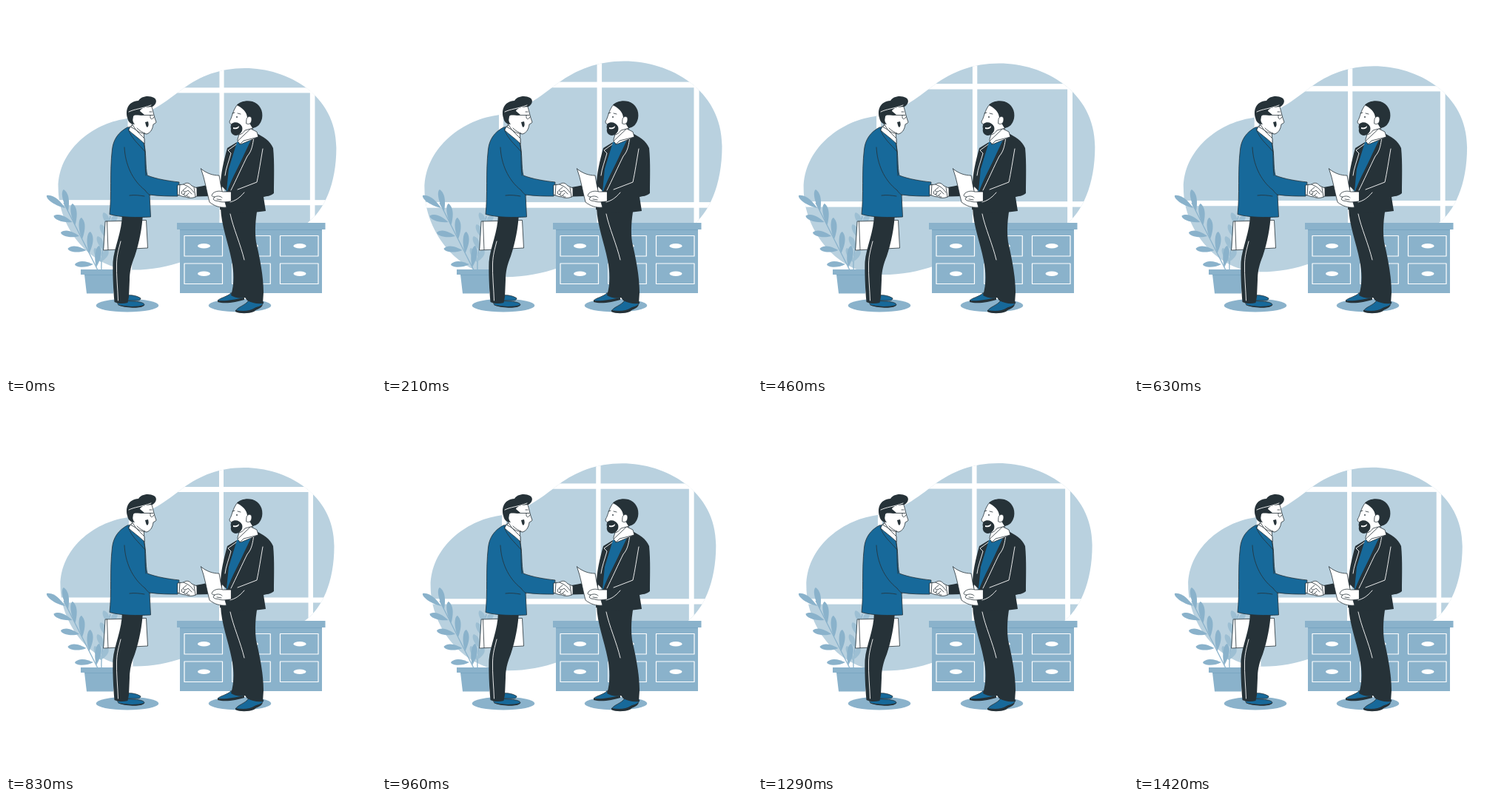
Write an HTML page that moves like this. It is 500 by 500 pixels and loops after 1.5 s.

```html
<!DOCTYPE html>
<html lang="en">
<head>
<meta charset="utf-8">
<title>Handshake</title>
<style>
html, body { margin: 0; width: 100%; height: 100%; overflow: hidden; background: #fff; }
svg { display: block; width: 100%; height: 100%; }
.tint { fill: #b9d1df; }
.mid { fill: #8ab2cb; }
.pale { fill: #9dbfd3; }
.blue { fill: #17699a; }
.dark { fill: #263238; }
.white { fill: #fff; }
.ink { stroke: #263238; stroke-width: .8; stroke-linejoin: round; stroke-linecap: round; }
.light { stroke: #fff; stroke-width: .9; stroke-linecap: round; stroke-linejoin: round; }
.line { fill: none; }
</style>
</head>
<body>
<svg viewBox="0 0 500 500">
  <defs>
    <path id="shape" d="M322 86C378 86 443.500 121 443.500 192C443.500 241 427 276 405 292C372 314 290 326 240 343C220 350 198 354.500 174 354.500C118 354.500 73.500 300 73.500 245C73.500 196 118 160 163 153.500C196 148 216 131 240 113C262 97 288 86 322 86Z"/>
    <clipPath id="clip"><use href="#shape"/></clipPath>
  </defs>

  <g id="window">
    <use href="#shape" class="tint"/>
    <g class="white" clip-path="url(#clip)">
      <rect x="60" y="112" width="400" height="7"/>
      <rect x="60" y="261.500" width="400" height="7"/>
      <rect x="166" y="70" width="5.500" height="300"/>
      <rect x="288" y="70" width="6" height="300"/>
      <rect x="408.500" y="70" width="6.500" height="300"/>
    </g>
  </g>

  <g id="plant">
    <path class="line" stroke="#8ab2cb" stroke-width="1.300" d="M124 357L78 266M129 357C128 335 134 315 141 284"/>
    <g id="sprig" class="pale"></g>
    <g id="frond" class="mid"></g>
    <path class="mid" d="M101 356H152V363H148L145 388.500H109L106 363H101Z"/>
    <path class="line" stroke="#78a5c1" stroke-width=".8" d="M106 363.500H148"/>
  </g>

  <g id="cabinet">
    <path class="mid" d="M231 293H431.500V302H427V388H235V302H231Z"/>
    <path class="line" stroke="#78a5c1" stroke-width="1" d="M235 302.500H427"/>
    <g id="drawers" class="line light"></g>
  </g>

  <g class="mid">
    <ellipse cx="164" cy="404.700" rx="42.300" ry="8.800"/>
    <ellipse cx="316" cy="404.700" rx="42.300" ry="8.800"/>
  </g>

  <g id="guest">
    <path class="white ink" d="M134.500 291L189.500 289.500L191.500 327L132 330Z"/>
    <path class="line ink" d="M136.500 291L138 329.500"/>
    <path class="blue ink" d="M164 391C170 390 178 392 182 395C182 397 180 398 177 398H164Z"/>
    <path class="blue ink" d="M151 401C158 397 166 399 174 399C181 400 187 401 187 404C184 407 174 407 168 406.500C161 406 155 405 152 404Z"/>
    <path class="dark" d="M152 404C160 406 177 407 187 404C185 408 174 408 168 407.500C161 407 154 406 152 404Z"/>
    <path class="dark" d="M157 280H185C184 300 180 320 174 338C169 350 167 360 167 370L166 393L164.500 401C158 403 150 402 146.500 400C145 382 144 362 144.500 346C146 326 157 306 157 280Z"/>
    <path class="line light" d="M155 318C152 330 150 336 149.500 348C149 364 151 382 151.500 398"/>
    <path class="white ink" d="M170 161L186 163L187 187L168 168Z"/>
    <path class="blue ink" d="M164 164C151 171 145 181 143.500 194C140 224 143 256 140 281.500C156 286 178 286 195.500 285L194 255C207 257 221 257 232 257L234 238C220 236.500 204 234 191 229C188 217 190 200 186.500 186C181 176 173 169 168 164Z"/>
    <path class="line ink" d="M160 191C161 213 170 235 188 249C190 252 193 255 195 256M167 256C174 255 181 256 187 257M165 166C170 180 178 185 188 197M187 187C189 200 187 214 189 229"/>
    <path class="white ink" d="M168 163L175 167L187 179L187 186C180 179 171 173 166 168Z"/>
    <path class="white ink" d="M173 143C180 137 191 135 197 136C199 143 200 149 203 157C202 159 200 159 199 160C198 166 196 171 190 173C182 172 177 170 174 165L170 159Z"/>
    <path class="dark" d="M164 151C161 140 165 129 179 128C182 122 193 120 200 124C205 127 203 133 198 136C190 136 182 138 181 142L187 147C180 149 174 146 172 149C170 153 172 158 174 160C169 160 165 157 164 151Z"/>
    <path class="line light" d="M166 143C174 139 183 139 196 134"/>
    <path class="line ink" d="M182 147.500H199M195 147.500C194 154 198 154 200 150M194 143L197 143M188 172C184 171 180 168 177 165"/>
    <path class="dark" d="M188 157L192 156C193 160 193 162 191 164C189 163 189 160 188 157Z"/>
  </g>

  <g id="host">
    <path class="blue ink" d="M304 388L322 392C321 396 317 396 312 397C306 400 293 401 286 398C290 394 299 393 304 388Z"/>
    <path class="dark" d="M286 398C297 399 307 397 322 394V397C312 400 296 403 286 400Z"/>
    <path class="blue ink" d="M328 398L348 400C347 406 339 407 335 411C328 415 317 415 310 412C314 406 323 405 328 398Z"/>
    <path class="dark" d="M310 411C321 413 330 412 336 408C340 406 344 406 347 403C346 409 339 409 335 413C328 416 315 416 310 413Z"/>
    <path class="dark" d="M290 272H340C337 290 336 304 338 319C343 341 348 365 348 387L347 402C339 403 332 401 326 398L323 394C316 396 309 394 304 391C309 375 308 359 305 344C300 318 291 298 290 272Z"/>
    <path class="line light" d="M303 281C307 300 317 322 322 343"/>
    <path class="blue" d="M312 184L331 181L322 210L298 258L297 216Z"/>
    <path class="white ink" d="M317 168L330 160L336 172L316 187L313 181Z"/>
    <path class="dark" d="M338 172C347 176 357 182 361 192C363 211 362 235 362 253C358 257 352 257 348 258L351 277C334 280 309 280 289 275L290 253L299 250C306 231 314 218 322 200L331 181Z"/>
    <path class="dark" d="M312 184L299 192C294 210 290 228 290 242L298 250L301 220Z"/>
    <path class="dark" d="M292 240C280 240 267 243 256 245L258 257.500C270 257 281 257 292 256Z"/>
    <path class="line light" d="M335 178C333 187 333 195 326 203C320 215 310 237 304 249M311 187L300 195L304 199C301 210 297 220 296 229M347 193C344 210 342 224 339 238L313 248M322 252C315 260 310 263 303 265"/>
    <path class="white ink" d="M313 183L317 187L341 177L339 170L331 166Z"/>
    <path class="line ink" d="M316 187L321 182L341 177"/>
    <path class="white ink" d="M313 133C306 141 306 150 302 156C302 159 304 160 306 160L308 171C313 176 319 174 323 168L334 165L336 142L322 132Z"/>
    <path class="dark" d="M312 134C316 129 325 127 333 129C343 132 348 142 346 152C344 160 340 164 333 165L330 160L326 152C326 147 324 140 312 134Z"/>
    <path class="white ink" d="M325 153C326 148 332 148 332 153C332 158 329 161 325 159Z"/>
    <path class="dark" d="M305 159C309 156 316 157 319 163C321 169 316 175 310 175C305 174 303 170 304 166C303 163 304 160 305 159Z"/>
    <path class="white" d="M307 164C310 165 313 164 315 162C315 166 311 167 307 166Z"/>
    <path class="line ink" d="M306 145L309 144M313 145L317 146"/>
    <circle class="dark" cx="312" cy="150" r=".9"/>
    <path class="white ink" d="M263.500 220C271 226 279 229 288 229C290 244 294 258 298 272C289 273 281 270 275 265C271 250 269 235 263.500 220Z"/>
    <path class="white ink" d="M304 251L293 251C287 249 281 251 279 254C277 257 279 258 282 258L280 261C282 264 286 263 288 264C294 266 299 264 304 264Z"/>
    <path class="line ink" d="M282 258C286 256 290 257 292 259M285 261L291 262"/>
  </g>

  <g id="hands">
    <path class="white ink" d="M232 242L240 241C244 238 248 239 251 243L258 246V257C253 260 247 260 243 258C239 258 235 256 232 255Z"/>
    <path class="line ink" d="M240 241L246 244C250 246 252 250 254 252M244 245L239 249C240 252 244 251 246 249L251 254M238 250C236 253 238 256 241 254M242 252C239 255 241 258 244 256M247 253C243 255 244 259 248 258"/>
    <path class="line ink" d="M235 241L234 256M254 245L256 258"/>
  </g>
</svg>
<script>
const NS = "http://www.w3.org/2000/svg";
const $ = id => document.getElementById(id);
const mix = (a, b, f) => a + (b - a) * f;

function add(parent, tag, attrs) {
  const el = document.createElementNS(NS, tag);
  for (const k in attrs) el.setAttribute(k, attrs[k]);
  $(parent).appendChild(el);
}

// A leaf growing from (x, y) by (dx, dy), w wide on each side.
function leaf(parent, x, y, dx, dy, w) {
  const len = Math.hypot(dx, dy), nx = -dy / len * w, ny = dx / len * w;
  const at = (f, side) => `${x + dx * f + nx * side} ${y + dy * f + ny * side}`;
  add(parent, "path", {
    d: `M${x} ${y}C${at(.3, .9)} ${at(.75, 1.9)} ${at(1, 0)}C${at(.95, -1.3)} ${at(.4, -1.4)} ${x} ${y}Z`
  });
}

function growPlant() {
  for (let i = 0; i < 5; i++) {
    const f = i / 4, x = 80 + 9.5 * i, y = 273 + 19 * i;
    leaf("frond", x, y, -25, mix(-17, 0, Math.sqrt(f)), 3.8);
    leaf("frond", x + 4, y + 4, mix(-6, 4, f), -29, 3.8);
  }
  for (let i = 0; i < 4; i++) {
    const x = 140 - 4 * i, y = 298 + 16 * i;
    leaf("sprig", x, y, -8, -19, 3.5);
    leaf("sprig", x, y, 10, -17, 3.5);
  }
}

function fitDrawers() {
  for (let i = 0; i < 6; i++) {
    const x = 241 + 64.75 * (i % 3), y = i < 3 ? 310.5 : 348;
    add("drawers", "rect", { x, y, width: 51.5, height: 27.5, "stroke-width": 1.2 });
    add("drawers", "ellipse", { cx: x + 26.5, cy: y + 13.8, rx: 8.5, ry: 3.2, fill: "#fff", stroke: "none" });
  }
}

const LOOP = 1500, STEP = 1000 / 24, LAST = 34;
const CX = 258.5, CY = 220, BEAT = 7.04, LEAD = 1.1;

// One loop is five beats: up, slowly down over two, up, down.
function swell(k) {
  const p = (k + LEAD) / BEAT;
  if (p < 1) return p;
  return p < 3 ? (3 - p) / 2 : 1 - Math.abs(4 - p);
}

function draw(ms) {
  const k = Math.min(LAST, Math.floor((ms % LOOP + 4) / STEP));
  const s = 1 + .1 * swell(k);
  $("window").setAttribute("transform", `translate(${CX} ${CY}) scale(${s}) translate(${-CX} ${-CY})`);
}

growPlant();
fitDrawers();
const start = performance.now();
function tick() {
  draw(performance.now() - start);
  requestAnimationFrame(tick);
}
tick();
</script>
</body>
</html>
```
